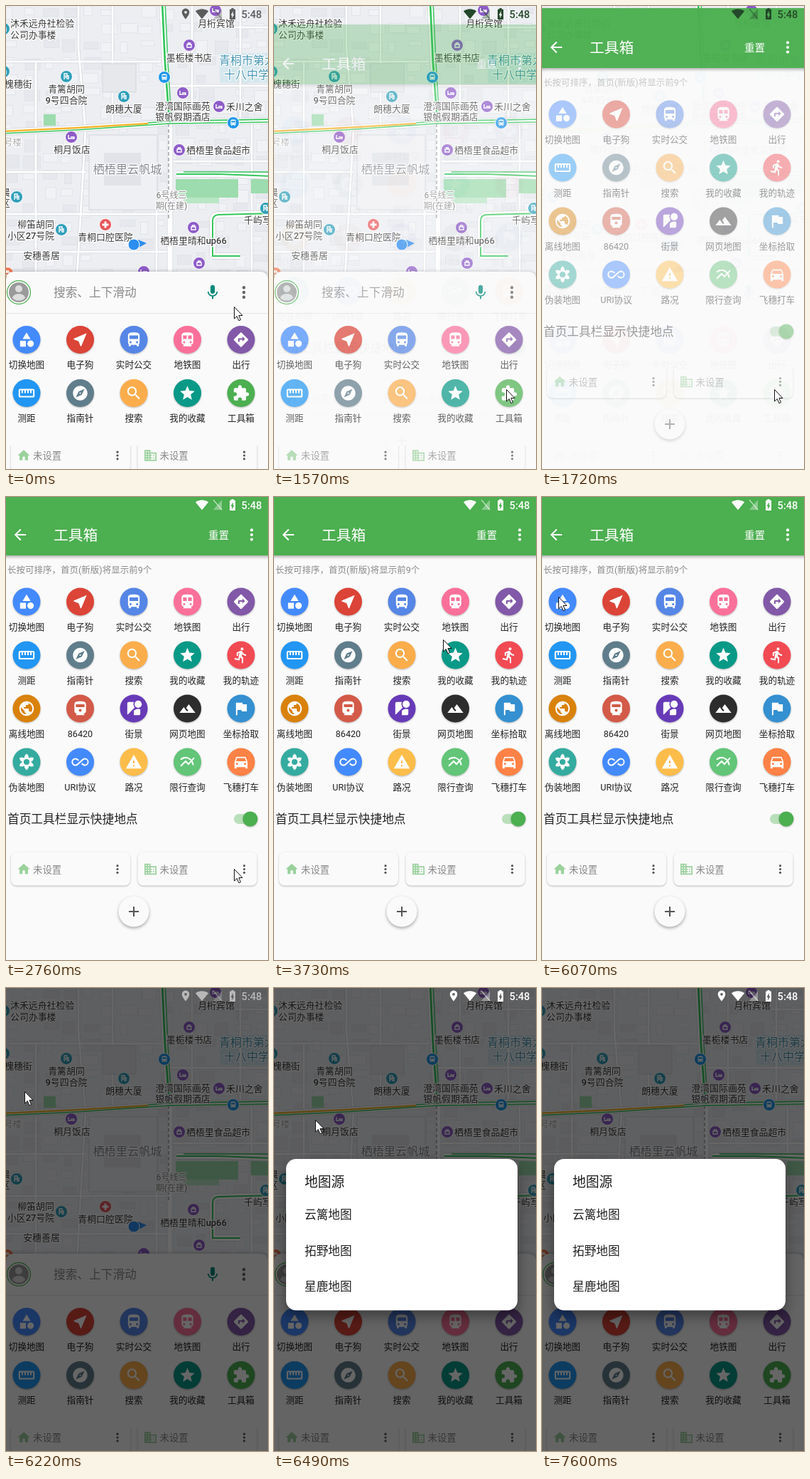
An HTML page for the animation above (7.75 s loop, 369 by 650 pixels).

```html
<!DOCTYPE html>
<html lang="zh-CN">
<head>
<meta charset="utf-8">
<title>地图工具箱</title>
<style>
html, body { margin: 0; height: 100%; overflow: hidden; background: #fafafa }
svg { display: block; width: 100%; height: 100%; font-family: Roboto, "Noto Sans CJK SC", sans-serif }
.halo { paint-order: stroke; stroke: #fff; stroke-width: 2.5px; stroke-linejoin: round; font-weight: 500 }
.low { filter: drop-shadow(0 1px 1px #0004) }
.mid { filter: drop-shadow(0 2px 2px #0005) }
.high { filter: drop-shadow(0 8px 9px #0006) }
</style>
</head>
<body>
<svg id="stage" viewBox="0 0 369 650" preserveAspectRatio="none"></svg>
<script>
const disc = (x, y, r) => `M${x - r} ${y}a${r} ${r} 0 1 0 ${2 * r} 0a${r} ${r} 0 1 0-${2 * r} 0z`;
const wheels = disc(7.5, 15.5, 1.5) + disc(16.5, 15.5, 1.5);
const ring = 'M12 2C6.48 2 2 6.48 2 12s4.48 10 10 10 10-4.48 10-10S17.52 2 12 2z';
const cab = 'M12 2c-4.42 0-8 .5-8 4v9.5C4 17.43 5.57 19 7.5 19L6 20.5v.5h12v-.5L16.5 19c1.93 0 3.5-1.57 3.5-3.5V6c0-3.5-3.58-4-8-4z';
// 24-unit glyphs, filled with the even-odd rule
const glyphs = {
  shapes: 'M12 2l-5.5 9h11zM3 13.5h8v8H3z' + disc(17.5, 17.5, 4.5),
  arrow: 'M21 3L3 10.53v.98l6.84 2.65L12.48 21h.98z',
  bus: 'M4 16c0 .88.39 1.67 1 2.22V20c0 .55.45 1 1 1h1c.55 0 1-.45 1-1v-1h8v1c0 .55.45 1 1 1h1c.55 0 1-.45 1-1v-1.78c.61-.55 1-1.34 1-2.22V6c0-3.5-3.58-4-8-4s-8 .5-8 4zM6 6h12v5H6z' + wheels,
  metro: cab + 'M6 6h5v5H6zM13 6h5v5h-5z' + wheels,
  train: cab + 'M6 6h12v4H6z' + disc(12, 14.5, 2),
  turn: 'M21.71 11.29l-9-9c-.39-.39-1.02-.39-1.41 0l-9 9c-.39.39-.39 1.02 0 1.41l9 9c.39.39 1.02.39 1.41 0l9-9c.39-.38.39-1.01 0-1.41zM14 14.5V12h-4v3H8v-4c0-.55.45-1 1-1h5V7.5l3.5 3.5z',
  ruler: 'M21 6H3c-1.1 0-2 .9-2 2v8c0 1.1.9 2 2 2h18c1.1 0 2-.9 2-2V8c0-1.1-.9-2-2-2zm0 10H3V8h2v4h2V8h2v4h2V8h2v4h2V8h2v4h2V8h2z',
  compass: ring + 'M14.19 14.19L6 18l3.81-8.19L18 6z' + disc(12, 12, 1.1),
  search: 'M15.5 14h-.79l-.28-.27A6.5 6.5 0 1 0 13.73 14.43l.27.28v.79l5 4.99L20.49 19z' + disc(9.5, 9.5, 4.5),
  star: 'M12 17.27L18.18 21l-1.64-7.03L22 9.24l-7.19-.61L12 2 9.19 8.63 2 9.24l5.46 4.73L5.82 21z',
  run: disc(13.5, 3.5, 2) + 'M9.89 19.38l1-4.4 2.1 2v6h2v-7.5l-2.1-2 .6-3c1.3 1.5 3.3 2.5 5.5 2.5v-2c-1.9 0-3.5-1-4.3-2.4l-1-1.6c-.4-.6-1-1-1.7-1-.3 0-.5.1-.8.1l-5.2 2.2v4.7h2v-3.4l1.8-.7-1.6 8.1-4.9-1-.4 2z',
  globe: ring + 'M11 19.93c-3.95-.49-7-3.85-7-7.93 0-.62.08-1.21.21-1.79L9 15v1c0 1.1.9 2 2 2zm6.9-2.54c-.26-.81-1-1.39-1.9-1.39h-1v-3c0-.55-.45-1-1-1H8v-2h2c.55 0 1-.45 1-1V7h2c1.1 0 2-.9 2-2v-.41c2.93 1.19 5 4.06 5 7.41 0 2.08-.8 3.97-2.1 5.39z',
  street: 'M12.56 14.33c-.34.27-.56.7-.56 1.17V21h7c1.1 0 2-.9 2-2v-5.98a9.2 9.2 0 0 0-8.44 1.31zM11.5 6c0-1.08.27-2.1.74-3H5c-1.1 0-2 .9-2 2v14c0 .55.23 1.05.59 1.41l9.82-9.82A6.4 6.4 0 0 1 11.5 6z' + disc(18, 6, 5),
  hills: 'M14 6l-3.75 5 2.85 3.8-1.6 1.2C9.81 13.75 7 10 7 10l-6 8h22z',
  flag: 'M14.4 6L14 4H5v17h2v-7h5.6l.4 2h7V6z',
  flower: 'M18.7 12.4c-.28-.16-.57-.29-.86-.4.29-.11.58-.24.86-.4 1.92-1.11 2.99-3.12 3-5.19-1.79-1.03-4.07-1.11-6 0-.28.16-.54.35-.78.54.05-.31.08-.63.08-.95 0-2.22-1.21-4.15-3-5.19C10.21 1.85 9 3.78 9 6c0 .32.03.64.08.95-.24-.2-.5-.39-.78-.55-1.92-1.11-4.2-1.03-6 0 0 2.07 1.07 4.08 3 5.19.28.16.57.29.86.4-.29.11-.58.24-.86.4-1.92 1.11-2.99 3.12-3 5.19 1.79 1.03 4.07 1.11 6 0 .28-.16.54-.35.78-.54-.05.32-.08.64-.08.96 0 2.22 1.21 4.15 3 5.19 1.79-1.04 3-2.97 3-5.19 0-.32-.03-.64-.08-.95.24.2.5.38.78.54 1.92 1.11 4.2 1.03 6 0-.01-2.07-1.08-4.08-3-5.19z' + disc(12, 12, 4),
  loop: 'M18.6 6.62c-1.44 0-2.8.56-3.77 1.53L7.8 14.39c-.64.64-1.49.99-2.4.99a3.38 3.38 0 0 1 0-6.76c.91 0 1.76.35 2.44 1.03l1.13 1 1.51-1.34L9.22 8.2A5.4 5.4 0 0 0 5.4 6.62a5.38 5.38 0 0 0 0 10.76c1.44 0 2.8-.56 3.77-1.53l7.03-6.24c.64-.64 1.49-.99 2.4-.99a3.38 3.38 0 0 1 0 6.76c-.9 0-1.76-.35-2.44-1.03l-1.14-1.01-1.51 1.34 1.27 1.12a5.4 5.4 0 0 0 3.82 1.57 5.38 5.38 0 0 0 0-10.75z',
  warn: 'M1 21h22L12 2zM13 18h-2v-2h2zm0-4h-2v-4h2z',
  chart: 'M22 6.92l-1.41-1.41-2.85 3.21C15.68 6.4 12.83 5 9.61 5 6.72 5 4.07 6.16 2 8l1.42 1.42C5.12 7.93 7.27 7 9.61 7c2.74 0 5.09 1.26 6.77 3.24l-2.88 3.24-4-4L2 16.99l1.5 1.5 6-6.01 4 4 4.05-4.55c.75 1.35 1.25 2.9 1.44 4.55H21c-.22-2.3-.95-4.39-2.04-6.14z',
  car: 'M18.92 6.01C18.72 5.42 18.16 5 17.5 5h-11c-.66 0-1.21.42-1.42 1.01L3 12v8c0 .55.45 1 1 1h1c.55 0 1-.45 1-1v-1h12v1c0 .55.45 1 1 1h1c.55 0 1-.45 1-1v-8zM5 11l1.5-4.5h11L19 11z' + disc(6.5, 14.5, 1.5) + disc(17.5, 14.5, 1.5),
  puzzle: 'M20.5 11H19V7c0-1.1-.9-2-2-2h-4V3.5a2.5 2.5 0 0 0-5 0V5H4c-1.1 0-2 .9-2 2v3.8h1.5a2.7 2.7 0 0 1 0 5.4H2V20c0 1.1.9 2 2 2h3.8v-1.5a2.7 2.7 0 0 1 5.4 0V22H17c1.1 0 2-.9 2-2v-4h1.5a2.5 2.5 0 0 0 0-5z',
  home: 'M10 20v-6h4v6h5v-8h3L12 3 2 12h3v8z',
  office: 'M12 7V3H2v18h20V7zM6 19H4v-2h2zm0-4H4v-2h2zm0-4H4V9h2zm0-4H4V5h2zm4 12H8v-2h2zm0-4H8v-2h2zm0-4H8V9h2zm0-4H8V5h2zm10 12h-8v-2h2v-2h-2v-2h2v-2h-2V9h8zm-2-8h-2v2h2zm0 4h-2v2h2z',
  mic: 'M12 14c1.66 0 3-1.34 3-3V5a3 3 0 0 0-6 0v6c0 1.66 1.34 3 3 3zm5.3-3c0 3-2.54 5.1-5.3 5.1S6.7 14 6.7 11H5c0 3.41 2.72 6.23 6 6.72V21h2v-3.28c3.28-.48 6-3.3 6-6.72z',
  back: 'M20 11H7.83l5.59-5.59L12 4l-8 8 8 8 1.41-1.41L7.83 13H20z',
  pin: 'M12 2C8.13 2 5 5.13 5 9c0 5.25 7 13 7 13s7-7.75 7-13c0-3.87-3.13-7-7-7z' + disc(12, 9, 2.5),
  wifi: 'M12 21.5L24 7C20 4 16 3 12 3S4 4 0 7z',
  power: 'M15.67 4H14V2h-4v2H8.33C7.6 4 7 4.6 7 5.33v15.33C7 21.4 7.6 22 8.33 22h7.33c.74 0 1.34-.6 1.34-1.33V5.33C17 4.6 16.4 4 15.67 4zM11 20v-5.5H9L13 7v5.5h2z'
};

const icon = (name, x, y, fill = '#fff', s = 1) =>
  `<path transform="translate(${x} ${y}) scale(${s}) translate(-12 -12)" d="${glyphs[name]}" fill="${fill}" fill-rule="evenodd"/>`;
const text = (str, x, y, size, fill, anchor = 'start', extra = '') =>
  `<text x="${x}" y="${y + size * .38}" font-size="${size}" fill="${fill}" text-anchor="${anchor}" ${extra}>${str}</text>`;
const rect = (x, y, w, h, fill, r = 0, extra = '') =>
  `<rect x="${x}" y="${y}" width="${w}" height="${h}" rx="${r}" fill="${fill}" ${extra}/>`;
const circle = (x, y, r, fill, extra = '') => `<circle cx="${x}" cy="${y}" r="${r}" fill="${fill}" ${extra}/>`;
const line = (d, color, w, extra = '') =>
  `<path d="${d}" fill="none" stroke="${color}" stroke-width="${w}" ${extra}/>`;
const dots = (x, y, r, gap, fill) => [-gap, 0, gap].map(d => circle(x, y + d, r, fill)).join('');

const tools = [
  ['切换地图', 'shapes', '#448aff'], ['电子狗', 'arrow', '#db4437'], ['实时公交', 'bus', '#5686e6'],
  ['地铁图', 'metro', '#fa709a'], ['出行', 'turn', '#8258a8'],
  ['测距', 'ruler', '#2196f3'], ['指南针', 'compass', '#607d8b'], ['搜索', 'search', '#fbad4c'],
  ['我的收藏', 'star', '#089987'], ['我的轨迹', 'run', '#f24a53'],
  ['离线地图', 'globe', '#d9820a'], ['86420', 'train', '#d35a48'], ['街景', 'street', '#673ab7'],
  ['网页地图', 'hills', '#2d2d2d'], ['坐标拾取', 'flag', '#3490d0'],
  ['伪装地图', 'flower', '#35aba0'], ['URI协议', 'loop', '#448aff'], ['路况', 'warn', '#fdbd4a'],
  ['限行查询', 'chart', '#62c578'], ['飞穗打车', 'car', '#ff8246']
];
const homeTools = [...tools.slice(0, 9), ['工具箱', 'puzzle', '#4caf50']];

const grid = (list, top) => list.map(([label, name, color], i) => {
  const x = 29 + i % 5 * 75.5, y = top + Math.floor(i / 5) * 75;
  return circle(x, y, 19.5, color, 'class="low"') + icon(name, x, y, '#fff', 1.02) +
    text(label, x, y + 35, 12.6, '#222', 'middle');
}).join('');

const cards = y => [['home', 7], ['office', 185.5]].map(([name, x]) =>
  rect(x, y - 24, 168, 47, '#fafafa', 8, 'class="low"') + icon(name, x + 18, y, '#9bd19d', .85) +
  text('未设置', x + 31, y, 13.4, '#888') + dots(x + 150, y, 1.6, 4.8, '#555')).join('');

function buildings() {
  let seed = 11, out = '';
  const rnd = () => (seed = seed * 16807 % 2147483647) / 2147483647;
  for (let y = 0; y < 375; y += 23)
    for (let x = -4; x < 369; x += 27)
      if (rnd() < .8)
        out += rect(x + rnd() * 7, y + rnd() * 6, 9 + rnd() * 15, 7 + rnd() * 11,
          rnd() < .4 ? '#e6e8ed' : '#f1f2f5', 0, 'stroke="#dcdfe5" stroke-width=".7"');
  return out;
}

const purple = '#8e5cc9', teal = '#2f9fba';
const marks = {
  bed: 'M-4-3v6M-4 2h8v1M-1 0h5v2', bag: 'M-3-1h6v4h-6zM-1.5-1v-2h3v2',
  tower: 'M-3 4v-8h4v8M1-1h2v5M-1-2v4', cross: 'M0-4.5v9M-4.5 0h9'
};
const poi = (x, y, color, mark) => circle(x, y, 8.5, color, 'stroke="#fff"') +
  line(marks[mark], '#fff', mark == 'cross' ? 3 : 1.4, `transform="translate(${x} ${y})"`);
const name = (str, x, y, anchor = 'middle', size = 12.9, fill = '#3a3a3a') =>
  text(str, x, y, size, fill, anchor, 'class="halo"');
const road = (d, w) => line(d, '#cfd2d9', w + 1.4) + line(d, '#fff', w);

function map() {
  const main = 'M-5 177L100 172L200 166L231 163L374 161';
  const side = 'M220-5L224 80L230 163';
  const east = 'M240 236H300L374 239';
  const corner = 'M291 352V301Q291 294 299 293L374 291M291 351H330';
  const minor = 'M102-5V60L112 175L100 380M-5 78H222M-5 233H112M-5 292H230M150-5V165M42 80V375M262 0V160' +
    'M330 0V160M231 112H374M346 160V375M231 218H374M212 180V375M-5 345H230M290 30H374';
  return rect(0, 0, 369, 380, '#eceef2') + buildings() + rect(301, 66, 68, 42, '#d6e8ee') + road(minor, 3) +
    rect(117, 181, 96, 105, '#eff0f3', 0, 'stroke="#d3d6dc"') + rect(138, 206, 52, 46, '#e1e3e8') +
    rect(136, 81, 47, 40, '#e6e8ec', 0, 'stroke="#d3d6dc"') +
    rect(53, 152, 17, 16, '#9ddcae') + rect(239, 243, 88, 26, '#9ddcae') + rect(250, 269, 50, 8, '#b9e6c5') +
    rect(345, 243, 24, 20, '#9ddcae') +
    [main, side, east, corner].map(d => road(d, 8)).join('') +
    road('M231 160V380', 7) + line('M229 165V300', '#b4b7bd', 2, 'stroke-dasharray="5 3"') +
    line('M-5 176L100 171L200 165', '#f5b52e', 2.4) + line('M-5 179L100 174L231 165L374 163', '#35c65c', 1.6) +
    line('M200 164L231 161.5L374 159', '#35c65c', 1.6) +
    line(side, '#2fc457', 2.6) + line('M224-5L228 80L233 163', '#46cc6b', 1.6) +
    line(east, '#35c65c', 2) + line('M250 233H374', '#35c65c', 1.5) + line(corner, '#35c65c', 2) +
    poi(295, 6, purple, 'bed') + poi(258, 55, purple, 'bag') + poi(249, 122, purple, 'bed') +
    poi(300, 141, purple, 'bed') + poi(92, 184, purple, 'bed') + poi(244, 202, purple, 'bag') +
    poi(264, 311, purple, 'bag') + poi(272, 361, purple, 'bag') + poi(194, 373, purple, 'bed') +
    poi(-3, 32, teal, 'tower') + poi(-3, 92, teal, 'tower') + poi(85, 99, teal, 'tower') +
    poi(166, 127, teal, 'tower') + poi(15, 268, teal, 'tower') + poi(78, 314, teal, 'tower') +
    poi(366, 284, teal, 'tower') + poi(2, 375, '#f07a55', 'bag') + poi(140, 307, '#e8555a', 'cross') +
    [[223, 100], [320, 164]].map(([x, y]) => circle(x, y, 8.5, '#1f97ea', 'stroke="#fff"') + icon('bus', x, y, '#fff', .45)).join('') +
    name('沐禾远舟社检验', 6, 24, 'start') + name('公司办事楼', 6, 40, 'start') + name('槐穗街', -2, 109, 'start') +
    name('青篱胡同', 85, 116) + name('9号四合院', 85, 132) + name('朗穗大厦', 166, 144) +
    name('月桁宾馆', 296, 24) + name('墨栀楼书店', 258, 72) +
    name('澄湾国际画苑', 249, 140) + name('银帆假期酒店', 249, 155) + name('禾川之舍', 310, 141, 'start') +
    name('青桐市第九', 300, 76, 'start', 16, '#4796b3') + name('十八中学', 307, 96, 'start', 16, '#4796b3') +
    name('桐月饭店', 93, 201) + name('栖梧里食品超市', 254, 202, 'start') +
    name('号楼', -3, 191, 'start', 12.5, '#aaa') + name('栖梧里云帆城', 171, 229, 'middle', 16.2, '#858890') +
    name('6号线三', 233, 265, 'middle', 12, '#888') + name('期(在建)', 233, 280, 'middle', 12, '#888') +
    name('晨', -7, 261, 'start') + name('区', -7, 276, 'start') +
    name('柳笛胡同', 42, 306) + name('小区27号院', 35, 322) + name('青桐口腔医院', 140, 324) +
    name('栖梧里晴和up66', 264, 329) + name('安穗善居', 50, 350) + name('千屿写', 335, 300, 'start') +
    `<path d="M186 328L198 333L187 339z" fill="#2b8df0"/>` + circle(180, 335, 8, '#2b8df0', 'stroke="#fff"');
}

const home = map() +
  rect(0, 373, 369, 300, '#fafafa', 10, 'style="filter:drop-shadow(0 -1px 2px #0003)"') +
  circle(18, 402, 16.4, '#fff', 'stroke="#4caf50" stroke-width="1.3"') + circle(18, 402, 14, '#9a9a9a') +
  `<path d="M9 410a9 6 0 0 1 18 0a13 13 0 0 1-18 0z" fill="#ddd"/>` + circle(18, 397, 5, '#ddd') +
  text('搜索、上下滑动', 67, 402, 16.7, '#8a8a8a') + icon('mic', 291, 402, '#00897b', 1.02) +
  dots(335, 402, 2.2, 6.8, '#666') + rect(0, 431, 369, 1, '#e4e4e4') + grid(homeTools, 468.5) +
  `<clipPath id="low"><path d="M0 617h369v40H0z"/></clipPath><g clip-path="url(#low)">${cards(631)}</g>`;

const toolbox = `<g id="content">` +
  text('长按可排序，首页(新版)将显示前9个', 2, 102, 12.5, '#8a8a8a') + grid(tools, 147) +
  text('首页工具栏显示快捷地点', 2, 452, 16.7, '#222') +
  rect(321, 445, 30, 14, '#b9dfbb', 7) + circle(344, 452, 10.5, '#4caf50', 'class="low"') + cards(522.5) +
  circle(180, 582, 21.5, '#fafafa', 'class="mid"') + line('M173 582h14M180 575v14', '#555', 2) + `</g>` +
  rect(-5, -2, 379, 84, '#4caf50', 0, 'class="mid"') + icon('back', 20, 53, '#fff', 1.03) +
  text('工具箱', 67, 53, 20.8, '#fff') + text('重置', 285, 53, 14.6, '#fff', 'start', 'font-weight="500"') +
  dots(346, 53, 2.1, 6.6, '#fff');

const dialog = rect(17, 240, 326, 212.5, '#fff', 14, 'class="high"') +
  text('地图源', 43, 272, 18.8, '#1c1c1c', 'start', 'font-weight="500"') +
  ['云篱地图', '拓野地图', '星鹿地图'].map((s, i) => text(s, 43, 318 + i * 50.5, 16.7, '#222')).join('');

const status = `<g id="pin">${icon('pin', 253, 11, 'currentColor', .75)}</g>` +
  icon('wifi', 276, 11, 'currentColor', .76) +
  `<path d="M304 4v14h-12z" fill="currentColor" opacity=".35"/>` + line('M292 4l12 14', 'currentColor', 1.3, 'opacity=".6"') +
  icon('power', 319, 11, 'currentColor', .8) +
  text('5:48', 346, 11.3, 14.6, 'currentColor', 'middle', 'font-weight="500"');

document.getElementById('stage').innerHTML = `<g>${home}</g>` +
  `<g id="page">${rect(0, 0, 369, 650, '#fafafa')}${toolbox}</g>` +
  rect(0, 0, 369, 650, '#000', 0, 'id="dim" opacity=".6"') +
  `<g id="dialog">${dialog}</g><g id="status">${status}</g>` +
  `<path id="cursor" d="M.5.5v16.5l3.8-3.5 2.6 6.2 2.6-1.1-2.6-6.1h5.1z" fill="#fff" stroke="#111" stroke-width="1"/>`;

const el = id => document.getElementById(id);
const [page, content, dim, box, bar, pin, cursor] =
  ['page', 'content', 'dim', 'dialog', 'status', 'pin', 'cursor'].map(el);
const show = (node, on) => node.setAttribute('visibility', on ? 'visible' : 'hidden');
const fade = (node, v) => node.setAttribute('opacity', v);

const LOOP = 7750;
const smooth = p => p * p * (3 - 2 * p), easeOut = p => 1 - (1 - p) ** 3, easeIn = p => p ** 3;
// start, end, steps, from x y, to x y, easing
const moves = [
  [150, 570, 4, 321, 422, 327, 538, smooth],
  [2760, 3730, 8, 325, 536, 238, 200, smooth],
  [3850, 4780, 8, 238, 200, 17, 71, easeOut],
  [5060, 5360, 3, 17, 71, 17, 136, smooth],
  [6070, 7060, 8, 22, 139, 309, 510, easeIn],
  [7180, 7600, 4, 309, 510, 372, 652, smooth]
];

// The screen refreshes in n even steps; the first one lands at the start time.
const stepAt = (t, a, b, n) => Math.min(n, Math.floor((t - a) / (b - a) * (n - 1) + .15) + 1);

function draw(t) {
  let [, , , x, y] = moves[0];
  for (const [a, b, n, x0, y0, x1, y1, ease] of moves) {
    if (t < a) break;
    const p = ease(stepAt(t, a, b, n) / n);
    x = x0 + (x1 - x0) * p;
    y = y0 + (y1 - y0) * p;
  }
  cursor.setAttribute('transform', `translate(${Math.round(x)} ${Math.round(y)})`);

  const open = t >= 1570 && t < 6220, dimmed = t >= 6220;
  const k = open ? stepAt(t, 1570, 2020, 4) - 1 : 0;
  show(page, open);
  page.setAttribute('transform', `translate(0 ${[28, 5, 1, 0][k]})`);
  fade(page, [.3, .97, 1, 1][k]);
  fade(content, [.1, .45, .9, 1][k]);

  show(dim, dimmed);
  show(box, t >= 6340);
  fade(box, t < 6490 ? .6 : 1);
  show(pin, !open);
  bar.setAttribute('color', t >= 6340 || open && k > 1 ? '#fff' : dimmed ? '#b8b8b8' : open ? '#24482a' : '#5c5c5c');
}

const begin = performance.now();
(function frame() {
  draw((performance.now() - begin) % LOOP);
  requestAnimationFrame(frame);
})();
</script>
</body>
</html>
```
